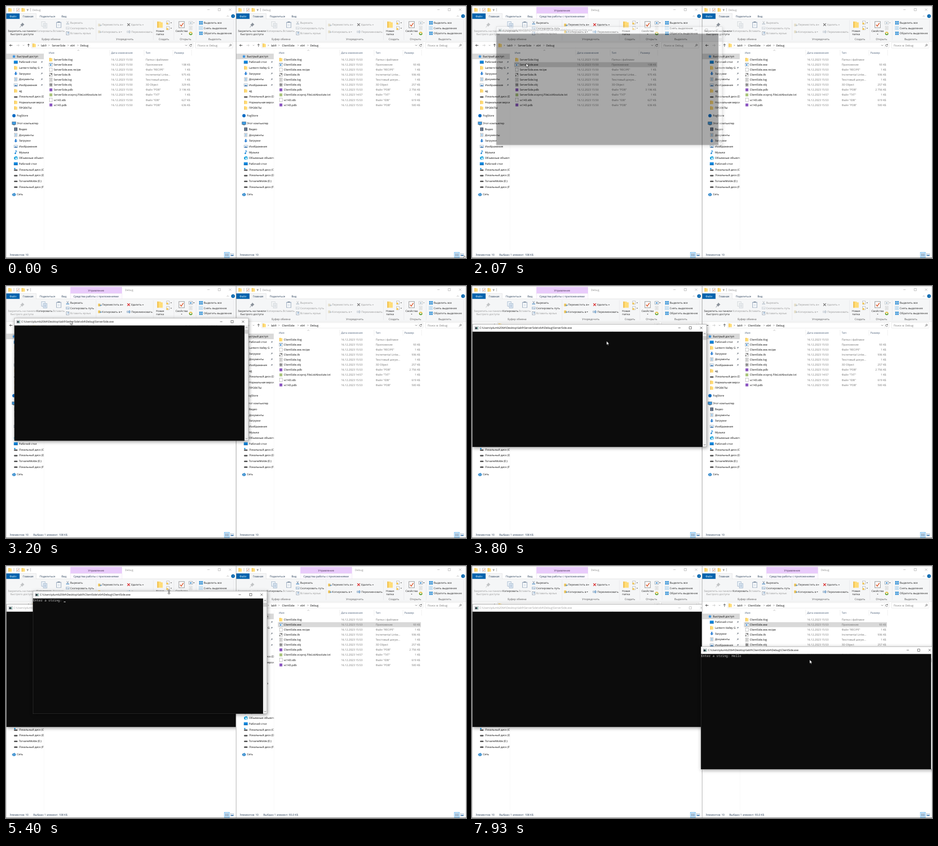
Recreate the animation shown at these times as an HTML page. Size 1011x554 px, loop 8000 ms.

```html
<!DOCTYPE html>
<html lang="ru">
<head>
<meta charset="utf-8">
<title>Server and client</title>
<style>
html, body { margin: 0; width: 100%; height: 100%; overflow: hidden; background: #fff; }
#stage { position: relative; width: 1011px; height: 554px; overflow: hidden; }
#stage > * { position: absolute; left: 0; top: 0; }
svg { display: block; overflow: hidden; }
text { font: 5.95px "Open Sans", "Noto Sans", sans-serif; text-rendering: geometricPrecision; white-space: pre; }
.mono { font: 7.02px "Noto Sans Mono", "DejaVu Sans Mono", monospace; fill: #ccc; }

#left { z-index: 1; }
#right { z-index: 1; transform: translateX(505.5px); animation: raise 8s step-end infinite; }
#server { z-index: 2; animation: server 8s linear infinite; }
#client { z-index: 4; animation: client 8s linear infinite; }
#pointer { z-index: 5; overflow: visible; animation: pointer 8s linear infinite; }
.console { width: 515px; height: 270px; transform-origin: 257.5px 135px; box-shadow: 1px 2px 8px rgba(0,0,0,.4); }
.bar { color: #000; }
#server .bar { animation: dim 8s step-end infinite; }

.head { color: #8c8c8c; }
.hover { opacity: 0; }
#left .head { animation: lHead 8s step-end infinite; }
#left .idle { animation: lIdle 8s step-end infinite; }
#left .picked { animation: lPick 8s step-end infinite; }
#left .row { animation: lRow 8s step-end infinite; }
#left .hover { animation: lHover 8s step-end infinite; }
#right .head { animation: rHead 8s step-end infinite; }
#right .idle { animation: rIdle 8s step-end infinite; }
#right .picked { animation: rPick 8s step-end infinite; }
#right .row { animation: rRow 8s step-end infinite; }
#right .hover { animation: rHover 8s step-end infinite; }

.caret { animation: typing 8s step-end infinite; }
.blink { animation: blink 8s step-end infinite; }
.arrow { animation: arrow 8s step-end infinite; }
.sizer { animation: sizer 8s step-end infinite; }

@keyframes raise { 0% { z-index: 1 } 58.3%, 100% { z-index: 3 } }
@keyframes dim { 0% { color: #000 } 58.3%, 100% { color: #999 } }
@keyframes lHead { 0% { color: #8c8c8c } 23.3% { color: #000 } 25.75%, 100% { color: #8c8c8c } }
@keyframes rHead { 0% { color: #8c8c8c } 58.3% { color: #000 } 61.5%, 100% { color: #8c8c8c } }
@keyframes lIdle { 0% { opacity: 1 } 23.3%, 100% { opacity: 0 } }
@keyframes rIdle { 0% { opacity: 1 } 58.3%, 100% { opacity: 0 } }
@keyframes lPick { 0% { opacity: 0 } 23.3%, 100% { opacity: 1 } }
@keyframes rPick { 0% { opacity: 0 } 58.3%, 100% { opacity: 1 } }
@keyframes lRow { 0% { fill: #cce8ff } 25.75%, 100% { fill: #d9d9d9 } }
@keyframes rRow { 0% { fill: #cce8ff } 61.5%, 100% { fill: #d9d9d9 } }
@keyframes lHover {
  0% { opacity: 0 }
  8.3% { opacity: 1; transform: translateY(55.35px) }
  9.1% { opacity: 1; transform: translateY(22.14px) }
  9.9% { opacity: 1; transform: none }
  10.8% { opacity: 0 }
  16.6% { opacity: 1; transform: none }
  18.2% { opacity: 1; transform: translateY(11.07px) }
  23.3%, 100% { opacity: 0 }
}
@keyframes rHover {
  0% { opacity: 0; transform: translateY(11.07px) }
  50.8% { opacity: 1; transform: translateY(11.07px) }
  58.3%, 100% { opacity: 0 }
}
@keyframes server {
  0%, 25.74% { opacity: 0; transform: translate(44.3px,40.3px) scale(.965) }
  25.75%, 25.9% { opacity: .36; transform: translate(44.3px,40.3px) scale(.965) }
  26.7% { opacity: .7; transform: translate(44.7px,40.7px) scale(.982) }
  27.5% { opacity: .92; transform: translate(45px,41px) scale(.994) }
  28.4%, 35.6% { opacity: 1; transform: translate(45px,41px) scale(1) }
  37.5% { transform: translate(38px,50px) scale(1) }
  39.2% { transform: translate(24px,65px) scale(1) }
  40.875% { transform: translate(12px,76px) scale(1) }
  41.7% { transform: translate(8px,79px) scale(1) }
  43.1%, 100% { opacity: 1; transform: translate(1px,84px) scale(1) }
}
@keyframes client {
  0%, 61.49% { opacity: 0; transform: translate(58.3px,54.3px) scale(.965) }
  61.5%, 61.65% { opacity: .36; transform: translate(58.3px,54.3px) scale(.965) }
  62.45% { opacity: .7; transform: translate(58.7px,54.7px) scale(.982) }
  63.25% { opacity: .92; transform: translate(59px,55px) scale(.994) }
  64.1%, 71.66% { opacity: 1; transform: translate(59px,55px) scale(1) }
  73.4% { transform: translate(150px,90px) scale(1) }
  75% { transform: translate(380px,165px) scale(1) }
  75.83% { transform: translate(465px,188px) scale(1) }
  76.625% { transform: translate(515px,198px) scale(1) }
  78.4% { transform: translate(522px,192px) scale(1) }
  80% { transform: translate(508px,181px) scale(1) }
  81.6%, 100% { opacity: 1; transform: translate(503px,177px) scale(1) }
}
@keyframes pointer {
  0% { transform: translate(1007px,549px) }
  2.5% { transform: translate(960px,520px) }
  5% { transform: translate(760px,400px) }
  7% { transform: translate(507px,249px) }
  8.4% { transform: translate(340px,170px) }
  9.6% { transform: translate(200px,125px) }
  10.875% { transform: translate(133px,110px) }
  14.1%, 15% { transform: translate(126px,111px) }
  20%, 30% { transform: translate(119px,126px) }
  33.375% { transform: translate(166.5px,63.5px) }
  35.6% { transform: translate(168px,47px) }
  37.5% { transform: translate(161px,56px) }
  39.2% { transform: translate(147px,71px) }
  40.875% { transform: translate(135px,82px) }
  41.7% { transform: translate(131px,85px) }
  43.1%, 45% { transform: translate(124px,90px) }
  45.9% { transform: translate(150px,97px) }
  46.65% { transform: translate(205px,107px) }
  47.5% { transform: translate(293.5px,121px) }
  48.3% { transform: translate(430px,125px) }
  49.1%, 50.1% { transform: translate(594px,124px) }
  51% { transform: translate(604px,125px) }
  53.5% { transform: translate(620px,127px) }
  57.5%, 62% { transform: translate(628px,128.5px) }
  64% { transform: translate(560px,110px) }
  66% { transform: translate(420px,72px) }
  67.5% { transform: translate(358.5px,57px) }
  68.5% { transform: translate(338px,57px) }
  70%, 71.66% { transform: translate(329px,60px) }
  73.4% { transform: translate(420px,95px) }
  75% { transform: translate(650px,170px) }
  75.83% { transform: translate(735px,193px) }
  76.625% { transform: translate(785px,203px) }
  78.4% { transform: translate(792px,197px) }
  80% { transform: translate(778px,186px) }
  81.6%, 84.2% { transform: translate(773px,182px) }
  87.5%, 100% { transform: translate(742px,206px) }
}
@keyframes arrow { 0% { opacity: 1 } 67.1% { opacity: 0 } 68.4%, 100% { opacity: 1 } }
@keyframes sizer { 0% { opacity: 0 } 67.1% { opacity: 1 } 68.4%, 100% { opacity: 0 } }
@keyframes blink { 0% { opacity: 1 } 70.75% { opacity: 0 } 85.8% { opacity: 1 } 99.06%, 100% { opacity: 0 } }
@keyframes typing {
  0% { transform: none }
  92.4% { transform: translateX(4.21px) }
  94% { transform: translateX(8.42px) }
  94.9% { transform: translateX(12.63px) }
  97.4% { transform: translateX(16.84px) }
  98.3%, 100% { transform: translateX(21.05px) }
}
</style>
</head>
<body>
<div id="stage">
  <div id="left"></div>
  <div id="right"></div>
  <div id="server" class="console"></div>
  <div id="client" class="console"></div>
  <svg id="pointer" width="10" height="14">
    <path class="arrow" d="M0 0V8.4L1.9 6.7L3.2 9.5L4.5 8.9L3.3 6.2H5.9Z" fill="#fff" stroke="#000" stroke-width=".6"/>
    <path class="sizer" d="M0-5.5L2.4-2.7H.7V2.7H2.4L0 5.5L-2.4 2.7H-.7V-2.7H-2.4Z" fill="#fff" stroke="#000" stroke-width=".6"/>
  </svg>
</div>
<script>
const text = (x, y, s, fill = '#000', anchor = 'start') =>
  `<text x="${x}" y="${y + 2.1}" fill="${fill}" text-anchor="${anchor}">${s}</text>`;
const mid = (x, y, s, fill) => text(x, y, s, fill, 'middle');
const box = (x, y, w, h, fill, extra = '') =>
  `<rect x="${x}" y="${y}" width="${w}" height="${h}" fill="${fill}" ${extra}/>`;
const line = (d, c = '#555', w = .7) =>
  `<path d="${d}" fill="none" stroke="${c}" stroke-width="${w}"/>`;
const tri = (x, y, c = '#444') => `<path d="M${x - 1.5} ${y - .8}h3l-1.5 1.7z" fill="${c}"/>`;
const page = (w, h) => box(-w / 2, -h / 2, w, h, '#fff', 'stroke="#8a8a8a" stroke-width=".6"');

const icons = {
  folder: '<path d="M-3.5-4H.5l1 1h2V4h-7z" fill="#ffdc78"/><path d="M-3.5-4h1.4V4h-1.4z" fill="#f0bd45"/>',
  doc: page(6.4, 8),
  lines: page(6.4, 8) + line('M-2-2H2M-2 0H2M-2 2H2', '#777', .8),
  check: page(7, 8) + line('M-2 0L-.5 2L2.2-2', '#d8562b', 1),
  exe: box(-4, -3.5, 8, 7, '#fff', 'stroke="#7b8a99" stroke-width=".6"') + box(-4, -3.5, 8, 1.6, '#9fb4c8') + box(-2, -.7, 3, 2.8, '#1d7fd0'),
  linked: page(6.4, 8) + line('M-1.5-2.5H1.8V1M-3.5 3L-1 .5', '#333', 1.1),
  solid: page(6.4, 8) + '<circle r="2.3" fill="#aaa" stroke="#333" stroke-width=".9"/>',
  purple: box(-3.3, -3.3, 6.6, 6.6, '#8a55c0'),
  green: box(-3.3, -3.3, 6.6, 6.6, '#a9c47a'),
  star: '<path d="M0-4L1.1-1.2L4-1L1.8.9L2.6 3.8L0 2.2L-2.6 3.8L-1.8.9L-4-1L-1.1-1.2Z" fill="#2f8ee0"/>',
  desk: box(-4.5, -3.3, 9, 6.6, '#1187dd') + box(-4.5, 2, 9, 1.3, '#0b5fa3'),
  down: '<path d="M-1.5-4h3V0H4L0 4L-4 0h2.5z" fill="#2b7fd4"/>',
  paper: page(6.4, 8) + line('M-2-2H2M-2 0H2M-2 2H2', '#3c8fd0', .9),
  image: box(-4.2, -3, 8.4, 6, '#e7f0f8', 'stroke="#8497a8" stroke-width=".6"') + '<path d="M-3.6 2.5L-1-.5L1 1L2.5 0L3.6 2.5z" fill="#3a78b5"/>',
  disk: box(-4, -.5, 8, 3, '#4a4a4a', 'rx=".8"') + box(-3, -1.3, 6, .8, '#b5b5b5'),
  system: box(-4, 0, 8, 3, '#4a4a4a', 'rx=".8"') + box(-3.8, -3.5, 3, 3, '#1b9be8'),
  dot: '<circle r="3.6" fill="#0a6cc4"/>',
  pc: box(-4.3, -3.5, 8.6, 5.8, '#3f9be0', 'stroke="#55697a" stroke-width=".7"') + box(-2.5, 2.8, 5, 1, '#55697a'),
  film: box(-3.5, -4, 7, 8, '#3b4550') + box(-1.8, -3.2, 3.6, 2.8, '#7d93b8') + box(-1.8, .4, 3.6, 2.8, '#7d93b8'),
  note: line('M.2 2.5V-3.8L2.8-1.5', '#1684d8', 1.2) + '<circle cx="-1.2" cy="2.6" r="1.7" fill="#1684d8"/>',
  cube: '<path d="M-4-2L1-4L4-2.5V3L-1 4L-4 2.5z" fill="#16a2dc"/>' + box(-1, -1, 3.5, 4, '#d3effa'),
  net: '<path d="M-4-1L1-3.5L4-1V2L0 4L-4 2z" fill="#2d84c8"/>' + line('M-3 0L3-1.5M-3 2L3 .7', '#a9d6f2', .7),
  grid: [-4, .4].map(x => [-3.8, .4].map(y => box(x, y, 3.6, 3.4, '#2f8fd6')).join('')).join(''),
  hollow: [-4, .6].map(x => [-3.8, .6].map(y => box(x, y, 3, 2.8, '#fff', 'stroke="#6fb0de" stroke-width=".6"')).join('')).join(''),
  pin: '<path d="M1-6L6-1L4.5-.3L2 2L1.5 4L-.8 1.7L-5 6L-5.6 5.6L-1.7 .8L-4-1.5L-2-2L.3-4.5Z" fill="#8b929b"/>',
  copy: box(-6, -7, 8, 10, '#eef4fa', 'stroke="#8ba3bd" stroke-width=".7"') + box(-2, -3, 8, 10, '#dfeaf5', 'stroke="#8ba3bd" stroke-width=".7"') + line('M0 0H4M0 2H4M0 4H4', '#8ba3bd'),
  paste: box(-5.5, -6, 11, 13, '#8fa3ba') + box(-4, -4, 8, 10, '#fff') + box(-2.5, -7, 5, 2.5, '#6b7d92') + line('M-2-1H2M-2 1H2M-2 3H2', '#9ab4d0'),
  cut: line('M-2-3.5L1.5 2M2-3.5L-1.5 2', '#5c738d', .8) + line('M-3 2.5a1.2 1.2 0 1 0 2.4 0a1.2 1.2 0 1 0-2.4 0M.6 2.5a1.2 1.2 0 1 0 2.4 0a1.2 1.2 0 1 0-2.4 0', '#2f7fc4', .8),
  path: box(-3.8, -2.5, 7.6, 5, '#fff', 'stroke="#5a88b5" stroke-width=".7"') + line('M-2.5 1L-1-1M0 1H2.5', '#357'),
  link: box(-3, -3.5, 6, 7, '#fff', 'stroke="#5f7389" stroke-width=".8"') + line('M-1.5 1.5L1.5-1.5M-.5-1.5H1.5V.5', '#246fb5', .8),
  move: box(-4, -3, 5.5, 6.5, '#f1c65a') + line('M-1 1H4M2-1L4 1L2 3', '#2473bd', 1),
  rename: box(-4, -1.5, 8, 3.5, '#fff', 'stroke="#47739f" stroke-width=".7"') + line('M-2 .3H1M2-3.5V4', '#1d6fb8', .9),
  add: page(6, 7) + box(-3.5, 0, 4, 4, '#f0c65a'),
  open: box(-4, -3, 8, 6, '#fff', 'stroke="#66798c" stroke-width=".7"') + box(-1.5, -1, 3, 2.5, '#2583cf'),
  past: '<circle r="3.7" fill="#e8c34a"/><path d="M-3.7 0A3.7 3.7 0 0 0 3.7 0z" fill="#5aa545"/><circle r="1.5" fill="#fff"/>',
  cross: line('M-2.8-2.8L2.8 2.8M2.8-2.8L-2.8 2.8', 'currentColor', 1.5)
};
const icon = (name, x, y, k = 1, extra = '') =>
  `<g transform="translate(${x} ${y}) scale(${k})" ${extra}>${icons[name]}</g>`;

const buttons = (x, y, step) => line(
  `M${x - 2.5} ${y}h5M${x + step - 2.5} ${y - 2.5}h5v5h-5zM${x + 2 * step - 2.5} ${y - 2.5}l5 5m0-5l-5 5`,
  'currentColor', .6);

// Ribbon parts whose state depends on whether a file is selected.
function commands(picked) {
  const on = '#222', off = '#969696';
  const file = picked ? on : off, place = picked ? off : on;
  const faded = 'opacity=".5" style="filter:grayscale(.6)"';
  const f = picked ? '' : faded, p = picked ? faded : '';
  return icon('pin', 35, 42, .9, p) + mid(35, 55, 'Закрепить на панели', place) + mid(35, 62, 'быстрого доступа', place) +
    icon('copy', 84, 41.5, 1, f) + mid(84.5, 55, 'Копировать', file) +
    icon('cut', 135.5, 37, 1, f) + text(141, 37, 'Вырезать', file) +
    icon('path', 135.5, 48.5, .9, f) + text(141, 48.5, 'Скопировать путь', file) +
    icon('move', 206, 41.5, .9, f) + text(211, 41, 'Переместить в', file) + tri(256, 41.5, file) +
    icon('move', 206, 56.5, .9, f) + text(211, 56.5, 'Копировать в', file) + tri(253.5, 57, file) +
    icon('cross', 269.5, 41, 1, `color="${picked ? '#d92b2b' : '#777'}"`) + text(274.5, 41, 'Удалить', file) + tri(301, 41.5, file) +
    icon('rename', 269.5, 56.5, .9, f) + text(275.5, 56.5, 'Переименовать', file) +
    icon('open', 406, 37, 1, f) + tri(413, 37, file) + icon('lines', 406, 48.5, .95, 'opacity=".5"');
}

const sidebar = [
  [110.7, 'star', 'Быстрый доступ'],
  [123.3, 'desk', 'Рабочий стол', 1], [135.9, 'folder', 'Lantern-Valley G', 1], [148.5, 'down', 'Загрузки', 1],
  [161.2, 'paper', 'Документы', 1], [173.8, 'image', 'Изображения', 1], [186.5, 'folder', 'ag'],
  [199.1, 'disk', 'Локальный диск (D:)'], [211.7, 'folder', 'Нормальная версия'], [224.3, 'folder', 'ПРОЕКТЫ'],
  [241.2, 'dot', 'FogStore'], [258.2, 'pc', 'Этот компьютер'],
  [270.9, 'film', 'Видео'], [283.5, 'paper', 'Документы'], [296.2, 'down', 'Загрузки'], [308.8, 'image', 'Изображения'],
  [321.5, 'note', 'Музыка'], [334.1, 'cube', 'Объемные объекты'], [346.8, 'desk', 'Рабочий стол'],
  [359.4, 'system', 'Локальный диск (C:)'], [372, 'disk', 'Локальный диск (D:)'], [384.7, 'disk', 'TorvaneMolde (E:)'],
  [397.4, 'disk', 'Локальный диск (F:)'], [414.2, 'net', 'Сеть']
];
const roots = ['star', 'dot', 'pc', 'net'];

const files = [
  ['.tlog', 'Папка с файлами', 'folder'], ['.exe', 'Приложение', 'exe'], ['.exe.recipe', 'Файл "RECIPE"', 'doc'],
  ['.ilk', 'Incremental Linke...', 'linked'], ['.log', 'Текстовый докум...', 'lines'], ['.obj', '3D Object', 'solid'],
  ['.pdb', 'Файл "PDB"', 'purple'], ['.vcxproj.FileListAbsolute.txt', 'Файл "TXT"', 'green'],
  ['vc143.idb', 'Файл "IDB"', 'doc'], ['vc143.pdb', 'Файл "PDB"', 'purple']
];

function explorer(id, name, sizes, time, listTime, total) {
  const navy = '#1e3550', gray = '#6d6d6d', dim = '#969696';
  const nav = sidebar.map(([y, pic, label, pinned]) => {
    const root = roots.includes(pic);
    return icon(pic, root ? 17.5 : 21.5, y, root ? 1 : .95) +
      `<g clip-path="url(#${pinned ? 'pinned' : 'nav'})">${text(root ? 24 : 28.5, y, label)}</g>` +
      (pinned ? icon('pin', 78.5, y, .42) : '');
  }).join('');
  const rows = files.map(([file, type, pic], i) => {
    const y = 117.9 + 11.07 * i;
    return icon(pic, 98.7, y, .95) + text(105, y, file[0] === '.' ? name + file : file) +
      text(231, y, '16.12.2023 ' + (i === 7 ? listTime : time), gray) + text(307, y, type, gray) +
      (sizes[i] ? text(405, y, sizes[i] + ' КБ', gray, 'end') : '');
  }).join('');
  const groups = [[99, 'Буфер обмена'], [261, 'Упорядочить'], [347, 'Создать'], [394.5, 'Открыть'], [459, 'Выделить']]
    .map(([x, s]) => mid(x, 72.5, s, '#555')).join('');
  const chevrons = [71, 94.5, 136.5, 158].map(x => line(`M${x - .8} 85l1.5 1.6l-1.5 1.6`, '#555', .7)).join('');

  document.getElementById(id).innerHTML = `<svg width="506" height="554">
    <clipPath id="nav"><rect width="83" height="554"/></clipPath>
    <clipPath id="pinned"><rect width="75.5" height="554"/></clipPath>` +
    box(0, 0, 506, 554, '#fff') +
    // title and tabs
    icon('folder', 9, 8.5) + icon('check', 26, 8.5, .9) + icon('folder', 38, 8.5) +
    line('M17.5 4.5V12M54 4.5V12', '#999') + line('M45.5 7.5h4', '#333') + tri(47.5, 10) +
    `<g class="head">${buttons(445, 8, 23.8)}</g>` +
    `<g class="idle"><g class="head">${text(58, 8.5, 'Debug', 'currentColor')}</g></g>` +
    box(0, 28, 505.5, 50, '#f5f6f7') + line('M0 28.2H505.5M0 78.2H505.5', '#dadbdc') +
    box(.5, 16.3, 29.5, 12, '#0063ad') + mid(15.3, 22.7, 'Файл', '#fff') +
    '<path d="M30.2 28.6V16.5H66.5V28.6" fill="#f5f6f7" stroke="#dadbdc" stroke-width=".6"/>' +
    mid(48.5, 22.7, 'Главная', navy) + mid(91, 22.7, 'Поделиться', navy) + mid(127.5, 22.7, 'Вид', navy) +
    line('M485.5 23.3l2-2l2 2', '#777') + '<circle cx="499" cy="22.3" r="4" fill="#0063ad"/>' + mid(499, 22.4, '?', '#fff') +
    '<g class="picked">' + box(141.5, 2, 113.5, 14.3, '#e9cbfb') +
    box(141.5, 16.3, 113.5, 11.8, '#fdfaff', 'stroke="#e3d6ea" stroke-width=".5"') +
    mid(198, 9.6, 'Управление', '#4a3157') + mid(198, 22.7, 'Средства работы с приложениями', navy) +
    `<g class="head">${text(261.5, 8.5, 'Debug', 'currentColor')}</g></g>` +
    // ribbon
    line('M198 31V75M324 31V75M369 31V75M418 31V75M500 31V75', '#dfe0e2', .6) + groups +
    `<g class="idle">${commands(false)}</g><g class="picked">${commands(true)}</g>` +
    icon('paste', 116, 41, 1, 'opacity=".75"') + mid(116, 55, 'Вставить', dim) +
    icon('link', 135.5, 60, 1, 'opacity=".75"') + text(141, 60, 'Вставить ярлык', dim) +
    icon('folder', 338.5, 41, 1.7) + mid(338.5, 55, 'Новая', '#222') + mid(338.5, 62, 'папка', '#222') +
    icon('add', 356, 36.5) + tri(363, 37) + icon('add', 356, 48.5) + tri(363, 49) +
    icon('check', 386, 41, 1.7) + mid(386, 55, 'Свойства', '#222') + tri(386, 62) + icon('past', 406, 60.3) +
    icon('grid', 428.5, 37) + text(434.5, 37, 'Выделить все', '#222') +
    icon('hollow', 428.5, 48.5) + text(434.5, 48.5, 'Снять выделение', '#222') +
    icon('grid', 428.5, 60, .95) + text(434.5, 60, 'Обратить выделение', '#222') +
    // address bar
    line('M14 86.5H8M10.5 84L8 86.5L10.5 89', '#222', .9) + line('M23 86.5h6M26.5 84l2.5 2.5l-2.5 2.5', '#c4c4c4', .9) +
    line('M37 85.7l1.6 1.6l1.6-1.6', '#777') + line('M49.5 89.5V83.5M47 86L49.5 83.5L52 86', '#333', .9) +
    box(56.5, 80.5, 354.5, 12, '#fff', 'stroke="#d9d9d9" stroke-width=".6"') + line('M401.5 81V92', '#e3e3e3', .6) +
    box(416.5, 80.5, 82, 12, '#fff', 'stroke="#d9d9d9" stroke-width=".6"') +
    icon('folder', 62, 86.4) + chevrons + text(77, 86.4, 'lab9') + text(101, 86.4, name) +
    text(141, 86.4, 'x64') + text(163, 86.4, 'Debug') + line('M394 85.5l2 2l2-2', '#444') +
    line('M407.8 85.2a2.4 2.4 0 1 0 .4 2.2M408 83.5v2h-2', '#333') + text(421, 86.4, 'Поиск в: Debug', '#777') +
    line('M490 89.5l2-2.2m0-1.5a1.7 1.7 0 1 0 3.4 0a1.7 1.7 0 1 0-3.4 0', '#333') +
    // navigation and list
    box(.6, 104.7, 82.4, 12.3, '#d9d9d9') + line('M83.5 96V536', '#f3f3f3', .5) + nav +
    text(94, 102.8, 'Имя', '#4c607a') + text(231, 102.8, 'Дата изменения', '#4c607a') +
    text(307, 102.8, 'Тип', '#4c607a') + text(370, 102.8, 'Размер', '#4c607a') +
    line('M228 96V109M303.5 96V109M367 96V109M408 96V109', '#e2e2e2', .6) + line('M157 98.3l2-1.8l2 1.8', '#777', .6) +
    box(92.5, 112.4, 314.5, 11, '#e5f3ff', 'class="hover"') +
    `<g class="picked">${box(92.5, 123.5, 314.5, 11, '#d9d9d9', 'class="row"')}</g>` + rows +
    // status bar and frame
    text(8, 547.3, 'Элементов: 10', navy) + `<g class="picked">${text(60, 547.3, 'Выбран 1 элемент: ' + total + ' КБ', navy)}</g>` +
    box(480, 541.5, 11, 11, '#cce8ff', 'stroke="#3b9ce0" stroke-width=".7"') +
    line('M482 545h3M482 547.2h3M482 549.4h3M486 545h3M486 547.2h3M486 549.4h3', '#456', .8) + icon('image', 497, 547, .85) +
    box(.3, .3, 505, 553.2, 'none', 'stroke="#999" stroke-width=".6"') + box(0, 553.1, 506, .9, '#666') + '</svg>';
}

function terminal(id, name, body = '') {
  document.getElementById(id).innerHTML = '<svg width="515" height="270">' +
    box(0, 0, 515, 16.4, '#fff') + box(0, 16.4, 506, 253.6, '#0c0c0c') + box(506, 16.4, 9, 253.6, '#f0f0f0') +
    box(506.5, 26, 8, 8.5, '#cdcdcd') + line('M508.5 22l2-2l2 2M508.5 264l2 2l2-2', '#444', .8) +
    box(5, 4.8, 8, 6.5, '#fff', 'stroke="#8b949c" stroke-width=".7"') + box(6, 6.5, 4, 4, '#27323a') + box(10, 6.5, 2, 4, '#6fae9c') +
    '<g class="bar">' + text(15.5, 8, `C:\\Users\\plumb2064\\Desktop\\lab9\\${name}\\x64\\Debug\\${name}.exe`, 'currentColor') +
    buttons(454.8, 8, 24) + '</g>' + body +
    box(.2, .2, 514.6, 269.6, 'none', 'stroke="#555" stroke-width=".4"') + '</svg>';
}

explorer('left', 'ServerSide', ['', '108', '1', '975', '1', '329', '3 196', '1', '627', '636'], '15:50', '14:56', '108');
explorer('right', 'ClientSide', ['', '93', '1', '936', '1', '257', '2 756', '1', '619', '500'], '15:53', '14:57', '93,0');
terminal('server', 'ServerSide');
terminal('client', 'ClientSide',
  '<text class="mono" x=".4" y="23">Enter a string: Hello</text>' +
  '<g class="caret">' + box(67.7, 17, 30, 9, '#0c0c0c') + box(67.9, 23.2, 4.1, 1.3, '#ccc', 'class="blink"') + '</g>');
</script>
</body>
</html>
```
